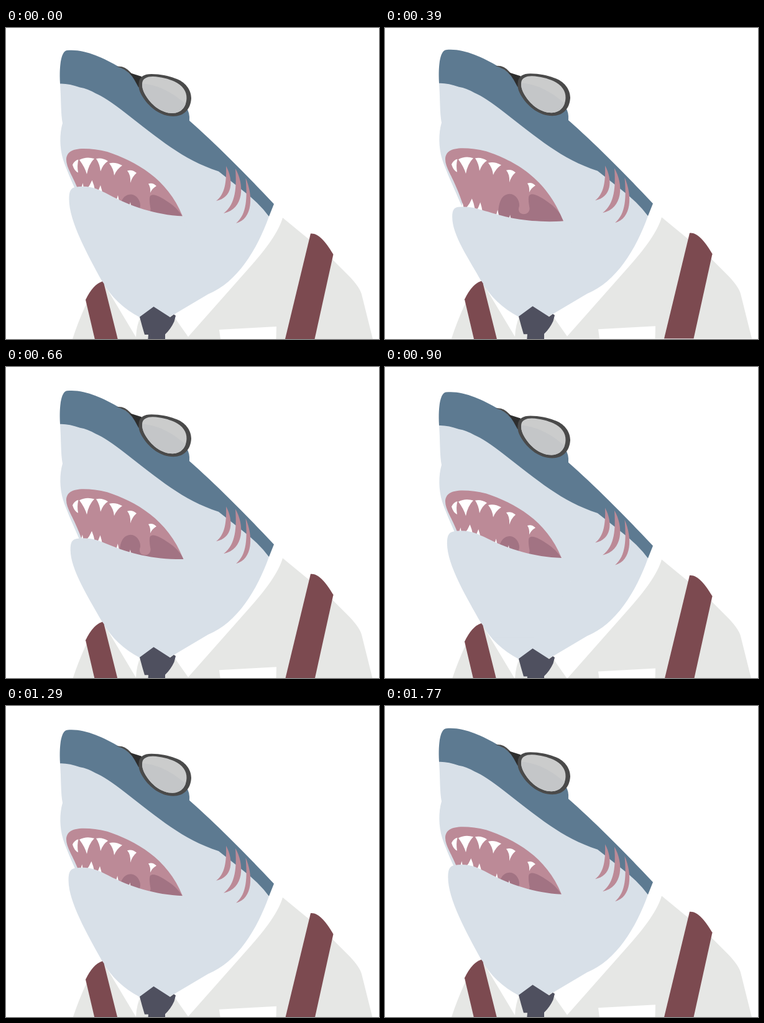
Write an HTML page with a canvas that moves like this. It is 600x500 px and loops after 1.8 s.

```html
<!DOCTYPE html>
<html lang="en">
<head>
<meta charset="utf-8">
<title>Shark in a shirt</title>
<style>
html, body { margin: 0; width: 100%; height: 100%; overflow: hidden; background: #fff; }
canvas { display: block; width: 600px; height: 500px; }
</style>
</head>
<body>
<canvas id="stage" width="600" height="500"></canvas>
<script>
const ctx = document.getElementById('stage').getContext('2d');
const LOOP = 1800, STEP = 30;
const C = {
  blue: '#5d7a91', skin: '#d8e0e8', shirt: '#e6e7e5', strap: '#7c4a50', tie: '#4f505f',
  mouth: '#bc8a97', throat: '#a27383', frame: '#4a4a4a', arm: '#2d2d2d',
  lens: '#c4c6c8', shine: '#cbcccc', white: '#fff'
};

function fill(color, d) {
  ctx.fillStyle = color;
  ctx.fill(new Path2D(d));
}

// Body height: quick sink, short rest, slow linear rise.
function bob(t) {
  if (t >= 900 && t < 930) return 4.6;
  if (t >= 330 && t < 900) {
    const p = (t - 330) / 570;
    return -1.6 + 6.2 * (p + 0.06 * Math.sin(Math.PI * p));
  }
  return 4.6 - 6.2 * ((t - 930 + LOOP) % LOOP) / 1200;
}

// Jaw opening
function gape(t) {
  if (t < 330) return 1.1 * t / 330;
  return t < 900 ? 1.1 * (900 - t) / 570 : 0;
}

function drawShirt() {
  fill(C.shirt, 'M107 500 Q115 475 128 446 L155 407 L237 460 L445 305 L490 342 L526 373 L553 400 Q569 417 572 428 L590 500 Z');
  fill(C.white, 'M155 407 L209 497 Q210 477 217 463 Z');
  fill(C.white, 'M268 461 L293 496.5 L390 387 C418 356 439 327 445 305 L431 283 L380 370 Z');
  fill(C.white, 'M343 485 L435 480 L434.5 500 L345 500 Z');
}

function drawHead() {
  fill(C.skin, 'M87 88 Q88 105 88.5 125 Q89 143 91 153 C86 170 86 192 92 212 C98 230 110 256 127 295 L170 390 L155 407 ' +
    'C168 432 190 452 215 465 L237 475 L271 460 L325 428 C372 409 404 356 423 303 L400 250 L200 90 Z');
  fill(C.blue, 'M87 90 C86 70 87 62 88 54 Q91 37 98 36 C125 33 155 47 183 63 Q202 70 214 94 L230 100 L290 128 Q296 136 295 149 ' +
    'C335 184 385 234 431 283 L423 303 Q407 281 378 259 L342 230.5 C283 211 246 178 192 136.5 Q160 111.5 144 105 Q131 97.5 119 95.5 Q101 89 87 89.5 Z');
  fill(C.mouth, 'M354 222 C367 246 364 273 338 278 C352 268 355 247 354 222 Z');
  fill(C.mouth, 'M369 226 C384 252 383 291 350 298 C370 283 371 255 369 226 Z');
  fill(C.mouth, 'M385.5 241 C398 270 397 307 370 314 C388 299 388 272 385.5 241 Z');
}

function drawGlasses() {
  fill(C.frame, 'M178 62 Q190 60 200 71 L206 78 L202 77 Q192 65 178 62 Z');
  fill(C.arm, 'M199 72 L218 78 L217 97 L213 95 Q207 83 199 72 Z');
  fill(C.frame, 'M213.5 90 C214 78 222 74 234 74 C248 74 262 77 272 81 C288 86 298 99 298 113 ' +
    'C297 131 286 142 269 142 C248 142 231 127 222 114 C216 105 213 99 213.5 90 Z');
  const glass = new Path2D('M219 90 C219 81 227 78 236 78 C250 78.5 262 82 271 86 C284 92 291 102 290.5 113 ' +
    'C290 127 282 136.5 268 137 C250 137 235 124 227 112 C221 103 219 97 219 90 Z');
  ctx.fillStyle = C.shine;
  ctx.fill(glass);
  ctx.save();
  ctx.clip(glass);
  fill(C.lens, 'M210 89 C243 88 272 106 293 126 L290 150 L220 145 Z');
  ctx.restore();
}

function drawMouth(open) {
  const cx = 284 + 3 * open, cy = 302.5 + 9 * open;
  const path = 'M97 212 C97 200 106 194 125 194 Q143 194 163 199 C208 214 260 242 ' + cx + ' ' + cy +
    ' Q210 ' + (cy + 8) + ' 128 293 C119 264 111 248 104 234 Q97 220 97 212 Z';
  fill(C.mouth, path);
  ctx.save();
  ctx.clip(new Path2D(path));
  fill(C.throat, 'M182 325 C181 292 182 268 201 267.5 C210 268 217 278 216 287 C213 295 217 300 223 300 ' +
    'C230 300 233 295 232.5 290 C231 282 230 273 232 270 C237 265 248 271 262 280.5 Q277 290 287 308 L292 325 Z');
  ctx.restore();
  fill(C.white, 'M107 220 Q110 213 116.5 211.5 Q114 221 116 232.5 Q110 230 107 220 Z' +
    'M118 212 Q129 206 142 210 Q133 219 130 235 Q127 224 118 212 Z' +
    'M145 210 Q155 208 164 214 Q156 219 152 230.5 Q151 219 145 210 Z' +
    'M166 217.5 Q176 215 187 221 Q178 227 174 237 Q173 226 166 217.5 Z' +
    'M195 229.5 Q203 227 210 233 Q203 239 200 249 Q201 236 195 229.5 Z' +
    'M229 250.5 Q236 248 242 254 Q235 258 232 265 Q233 256 229 250.5 Z');
}

function drawJaw(open, sway) {
  // closed point, open point, share of the sway
  const at = (x, y, ox, oy, w) =>
    (x + (ox - x) * open - 1.6 * sway * w) + ' ' + (y + (oy - y) * open + 4.2 * sway * w) + ' ';

  const teeth = [[123.5, 249, 4], [138.5, 244.5, 7], [152, 252.5, 5.5], [180, 268.5, 4], [200, 279.5, 3.5]];
  for (const [x, y, w] of teeth) {
    const k = (284 - x) / 160;
    const tx = x + open - 2 * sway * k, ty = y + open * (9.5 + 24.5 * k) + 4.4 * sway * k;
    const r = w * 0.45;
    fill(C.white, `M${tx} ${ty} Q${tx + r} ${ty + 7} ${tx + w * 0.7} ${ty + 17} L${tx - w * 1.3} ${ty + 15} Q${tx - r} ${ty + 8} ${tx} ${ty} Z`);
  }

  fill(C.skin, 'M155 408 C' + at(130, 362, 135, 372, 0.2) + at(101.5, 310, 108, 335, 0.8) + at(101.5, 275, 108, 306, 1) +
    'C' + at(101.5, 262, 108, 296, 1) + at(104, 257, 110, 291, 1) + at(112, 255.5, 118, 290, 1) +
    'C' + at(135, 252, 138, 288, 0.95) + at(148, 259, 150, 293, 0.85) + at(165, 267.5, 166, 297.5, 0.75) +
    'C' + at(200, 286.5, 200, 308, 0.5) + at(240, 300, 235, 314.5, 0.2) + at(284, 302.5, 287, 311.5, 0) +
    'L300 345 L240 430 L172 430 Z');
}

function drawOutfit() {
  fill(C.tie, 'M237.5 448 L264 465 L270 460.5 L273 462.5 L270.5 472 Q265 484 256 492.5 L256 505 L228 505 L229 493 L223 493 Q219 480 215 464.5 Z');
  fill(C.strap, 'M128 437 Q140 412 155 407.5 L157.5 411 L181 505 L144 505 Z');
  fill(C.strap, 'M490 330.5 C501 329 513 341 526.5 364 L496.5 500 L449 500 Z');
}

function draw(t) {
  const d = bob(t), open = gape(t);
  ctx.fillStyle = C.white;
  ctx.fillRect(0, 0, 600, 500);
  ctx.save();
  ctx.translate(0, d);
  drawShirt();
  drawHead();
  drawGlasses();
  drawMouth(open);
  drawJaw(open, d / 4.5);
  drawOutfit();
  ctx.restore();
}

const start = performance.now();
function tick(now) {
  const t = Math.max(0, now - start) % LOOP;
  draw(Math.floor(t / STEP) * STEP);
  requestAnimationFrame(tick);
}
draw(0);
requestAnimationFrame(tick);
</script>
</body>
</html>
```
